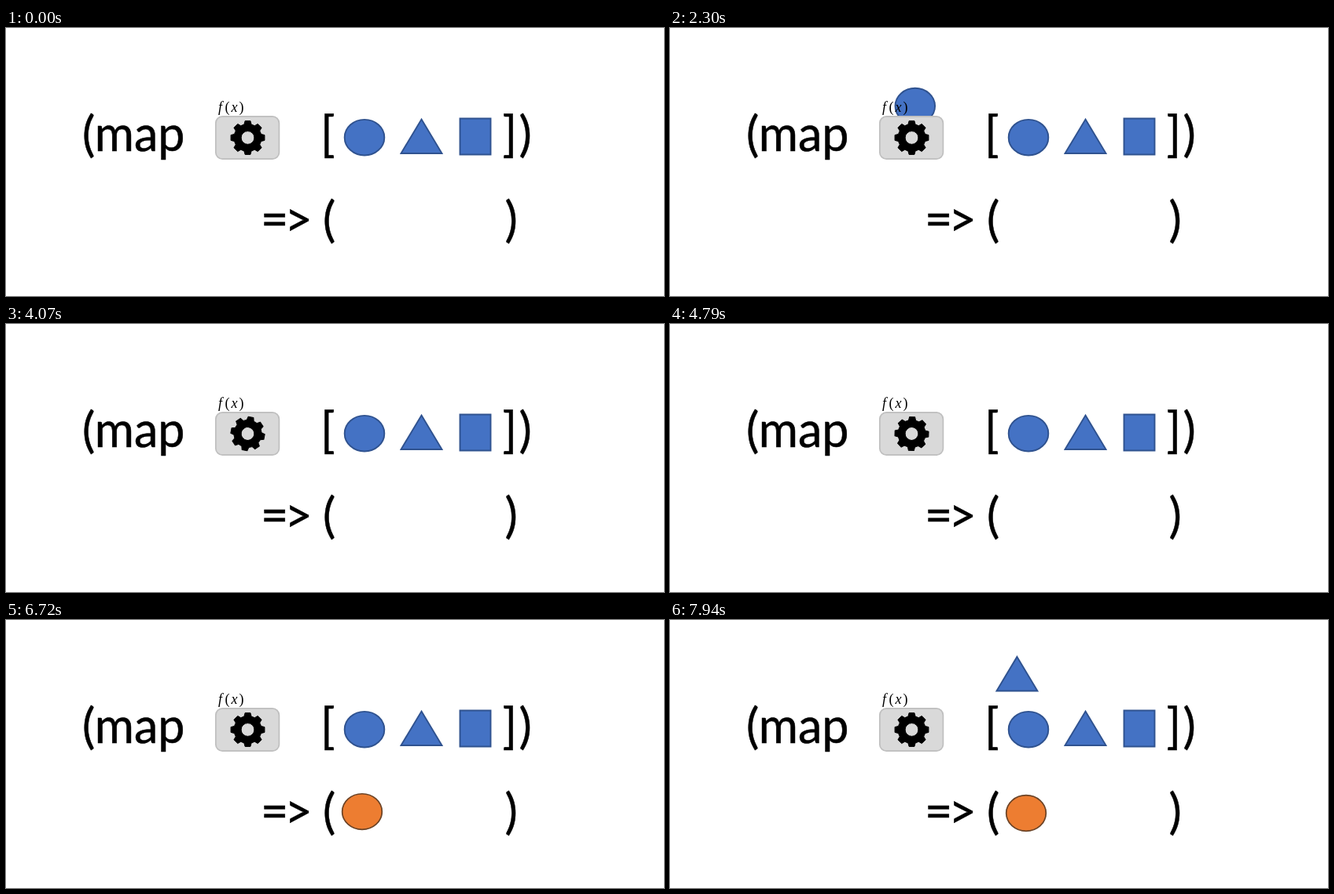
An HTML page that plays this animation: 837 by 342 pixels, repeating every 7990 ms.

```html
<!DOCTYPE html>
<html lang="en">
<head>
<meta charset="utf-8">
<title>map</title>
<style>
html, body { margin: 0; width: 100%; height: 100%; overflow: hidden; background: #fff; }
svg { display: block; width: 100%; height: 100%; }
.code { font: 61px Lato, Carlito, sans-serif; stroke: #000; stroke-width: .5; }
.math { font: 18px "Liberation Serif", "Noto Serif", serif; }
.math .i { font-style: italic; }
.blue { fill: #4472c4; stroke: #2f528f; stroke-width: 1.9; }
.orange { fill: #ed7d31; stroke: #6b4326; stroke-width: 1.7; }
</style>
</head>
<body>
<svg viewBox="0 0 837 342">
  <defs>
    <ellipse id="disc" rx="25.3" ry="22.8"/>
    <path id="tri" d="M0 -23.2L26 20.3H-26Z"/>
  </defs>
  <g class="code">
    <text x="97" y="157">(map</text>
    <text x="400" y="157">[</text>
    <text x="631.5" y="157">]</text>
    <text x="652.5" y="157">)</text>
    <text x="324" y="266">=</text>
    <text x="354.5" y="266">&gt;</text>
    <text x="403" y="266">(</text>
    <text x="634.5" y="266">)</text>
  </g>
  <g class="blue">
    <use href="#disc" x="456" y="139.7"/>
    <use href="#tri" x="528.5" y="139.7"/>
    <path d="M577.5 115.5H616.5V161.5H577.5Z"/>
    <use href="#disc" id="input"/>
    <use href="#tri" id="next"/>
  </g>
  <use href="#disc" id="output" class="orange"/>
  <rect x="266.8" y="112.8" width="80.6" height="54.4" rx="8.5" fill="#d9d9d9" stroke="#bfbfbf" stroke-width="1.7"/>
  <path id="gear" fill-rule="evenodd" stroke="#000" stroke-linejoin="round"/>
  <g class="math">
    <text class="i" x="270" y="107">f</text>
    <text x="278.5" y="107">(</text>
    <text class="i" x="286.5" y="107">x</text>
    <text x="296.5" y="107">)</text>
  </g>
</svg>
<script>
const LOOP = 7990, STEP = 50;
const el = id => document.getElementById(id);

const progress = (t, start, length) => Math.min(Math.max((t - start) / length, 0), 1);
const ease = u => u < .5 ? 4 * u ** 3 : 1 - 4 * (1 - u) ** 3;
// S-curve from 0 to 1; a higher n turns sharper corners
const bend = (e, n) => e ** n / (e ** n + (1 - e) ** n);
const mix = (a, b, k) => a + (b - a) * k;

// Up, across and down again
const arch = e => -4 * e * (1 - e);
// Down, level in the middle, down again
const stair = e => {
  const d = 2 * e - 1;
  return .5 + .5 * d * Math.abs(d) ** 3;
};

const moves = [
  { id: "input", start: 965, length: 2000, from: 456, to: 310, n: 2.5,
    y: e => 139.7 + 80 * arch(e), until: 3000 },
  { id: "output", start: 5000, length: 1900, from: 307, to: 453, n: 1.6,
    y: e => mix(140, 246.5, stair(e)), until: LOOP },
  { id: "next", start: 6950, length: 2000, from: 528.5, to: 307.5, n: 1.5,
    y: e => 139.7 + 71 * arch(e), until: LOOP }
];
const spin = { start: 2990, length: 2000 };

function gearShape(teeth, hole) {
  const pt = (r, deg) => {
    const a = deg * Math.PI / 180;
    return (r * Math.sin(a)).toFixed(2) + " " + (-r * Math.cos(a)).toFixed(2);
  };
  let d = "";
  for (let k = 0; k < teeth; k++) {
    const c = k * 360 / teeth;
    d += (k ? "L" : "M") + pt(17.6, c - 15) + "L" + pt(21.7, c - 9) +
      "L" + pt(21.7, c + 9) + "L" + pt(17.6, c + 15);
  }
  return d + `ZM${hole} 0A${hole} ${hole} 0 1 0 ${-hole} 0A${hole} ${hole} 0 1 0 ${hole} 0Z`;
}

function draw(ms) {
  const t = Math.floor(ms / STEP) * STEP;
  for (const m of moves) {
    const e = ease(progress(t, m.start, m.length));
    const x = mix(m.from, m.to, bend(e, m.n));
    el(m.id).setAttribute("transform", `translate(${x} ${m.y(e)})`);
    el(m.id).style.display = t >= m.start && t < m.until ? "" : "none";
  }
  const turn = 360 * progress(t, spin.start, spin.length);
  el("gear").setAttribute("transform", `translate(307.5 140) rotate(${turn})`);
}

el("gear").setAttribute("d", gearShape(8, 8.4));
const start = performance.now();
function tick() {
  draw((performance.now() - start) % LOOP);
  requestAnimationFrame(tick);
}
draw(0);
requestAnimationFrame(tick);
</script>
</body>
</html>
```
